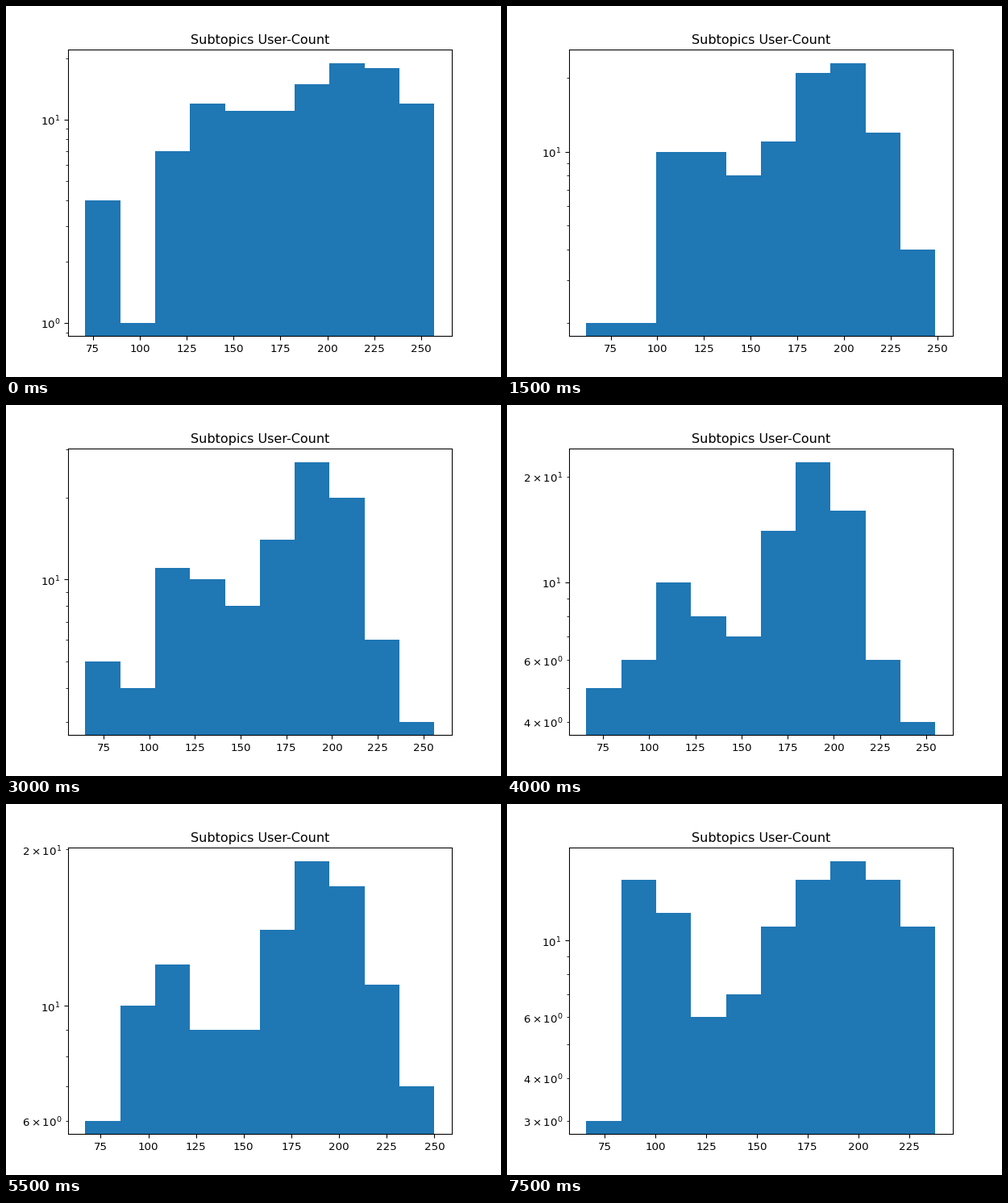
A matplotlib script that plays this animation: 614 by 460 pixels, repeating every 8 s.

```python
import numpy as np
import matplotlib.pyplot as plt
from matplotlib.animation import FuncAnimation
from matplotlib.transforms import ScaledTranslation

W, H, DPI = 614, 460, 96
STEPS, STEP_MS, BINS = 16, 500, 10

# Key points of the data range and of the shortest and tallest bars.
KEYS = (0, 3, 6, 8, 11, 13, 15)
LEFT = (71, 62, 65, 66, 67, 57, 66)
RIGHT = (257, 249, 256, 255, 250, 248, 238)
LEAST = (1, 2, 3, 4, 6, 1, 3)
MOST = (19, 23, 27, 22, 19, 20, 17)


def at(step, values):
    return np.rint(np.interp(step, KEYS, values))


def bump(x, center, width):
    return np.exp(-((x - center) / width) ** 2)


def profile(u):
    """Two drifting groups of users and a few stragglers in the first bin."""
    x = np.arange(BINS)
    swing = (u - 0.42) ** 2
    center = 2.6 - 1.4 * u
    width = np.where(x < center, 0.8, 2.6 - 1.3 * u)
    small = (0.34 + 1.6 * swing) * bump(x, center, width)
    large = bump(x, 6.1 + 4.5 * (u - 0.55) ** 2, 1.3 + 5 * swing)
    stragglers = 0.2 * (1 - u) * np.cos(2 * np.pi * u) ** 2 * (x == 0)
    return small + large + stragglers


def counts_at(step):
    shape = profile(step / (STEPS - 1))
    shape = (shape - shape.min()) / np.ptp(shape)
    low, high = at(step, LEAST), at(step, MOST)
    return np.rint(low + (high - low) * shape)


fig = plt.figure(figsize=(W / DPI, H / DPI), dpi=DPI, facecolor="white")
ax = fig.add_axes((76.8 / W, 50.688 / H, 476.16 / W, 354.816 / H))
text_shift = ScaledTranslation(0, -0.8 / DPI, fig.dpi_scale_trans)


def draw(step):
    counts = counts_at(step)
    edges = np.linspace(at(step, LEFT), at(step, RIGHT), BINS + 1)
    ax.clear()
    ax.bar(edges[:-1], counts, np.diff(edges), align="edge",
           color="#1f77b4", log=True)

    pad = 0.05 * (edges[-1] - edges[0])
    ax.set_xlim(edges[0] - pad, edges[-1] + pad)
    low, high = counts.min(), counts.max()
    margin = (high / low) ** 0.05
    ax.set_ylim(low / margin, high * margin)
    ax.set_title("Subtopics User-Count")

    labels = [*ax.get_xticklabels(), *ax.get_yticklabels(which="both")]
    for text in [ax.title, *labels]:
        text.set_transform(text.get_transform() + text_shift)
    return ax.patches


anim = FuncAnimation(fig, draw, frames=STEPS, interval=STEP_MS,
                     repeat=True, repeat_delay=0, blit=False)
plt.show()
```
